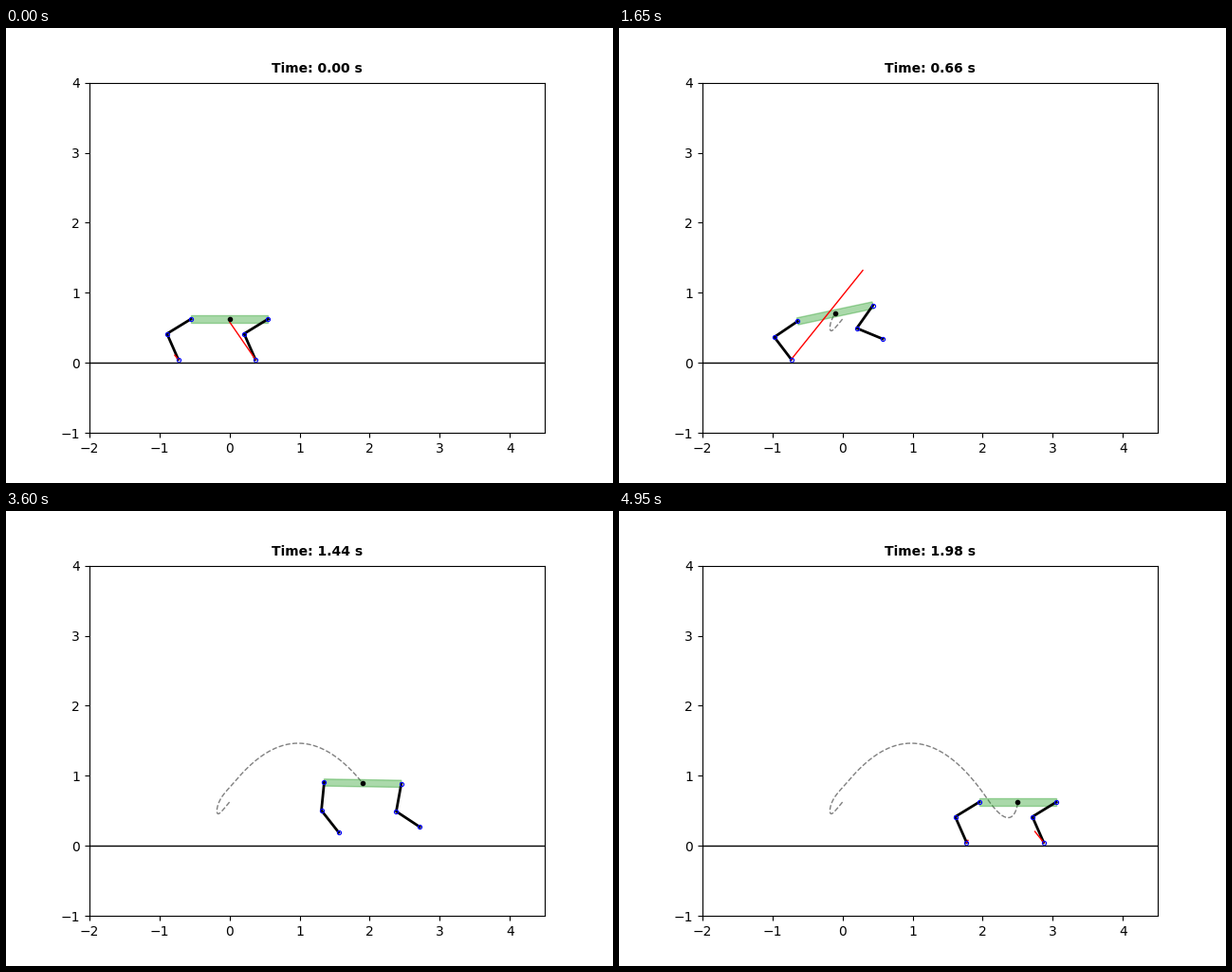
Recreate the animation shown at these times as a matplotlib script. Size 640 by 480 pixels, loop 5 s.

```python
import numpy as np
import matplotlib.pyplot as plt
from matplotlib.animation import FuncAnimation

FRAMES, STEP = 100, 0.02
LINK = 0.4                          # thigh and shank length
HALF_L, HALF_H = 0.55, 0.05         # half sizes of the torso
START, END = np.array([0, .625]), np.array([2.5, .625])
FOOT_BACK, FOOT_Y = 0.18, 0.05      # resting foot, behind its hip
LIFT, LAND, STOP = 0.78, 1.5, 1.98
APEX, APEX_T = np.array([.98, 1.465]), 1.099
SPEED, GRAVITY = 2.7, 9.81


def spline(t, times, values, ends=None):
    """Smooth cubic curve through key points; natural ends unless slopes are given."""
    x, y = np.array(times, float), np.array(values, float)
    h, n = np.diff(x), len(x)
    secant = np.diff(y, axis=0) / h.reshape((-1,) + (1,) * (y.ndim - 1))
    A, b = np.eye(n), np.zeros_like(y)
    for i in range(1, n - 1):
        A[i, i - 1:i + 2] = h[i], 2 * (h[i - 1] + h[i]), h[i - 1]
        b[i] = 3 * (h[i] * secant[i - 1] + h[i - 1] * secant[i])
    if ends is None:
        A[0, :2], A[-1, -2:] = (2, 1), (1, 2)
        ends = 3 * secant[0], 3 * secant[-1]
    b[0], b[-1] = ends
    m = np.linalg.solve(A, b)
    i = int(np.clip(np.searchsorted(x, t, side="right") - 1, 0, n - 2))
    u = (t - x[i]) / h[i]
    return (y[i] * (1 + 2 * u) * (1 - u) ** 2 + y[i + 1] * u * u * (3 - 2 * u)
            + h[i] * u * (1 - u) * (m[i] * (1 - u) - m[i + 1] * u))


def flight(t):
    s = t - APEX_T
    return APEX + [SPEED * s, -GRAVITY * s * s / 2]


def flight_speed(t):
    return np.array([SPEED, -GRAVITY * (t - APEX_T)])


def body(t):
    """Crouch and push off, fly, then absorb the landing."""
    rest = np.zeros(2)
    if t < LIFT:
        keys = [START, (-.089, .518), (-.172, .465), (-.103, .707), flight(LIFT)]
        return spline(t, (0, .28, .46, .66, LIFT), keys, (rest, flight_speed(LIFT)))
    if t < LAND:
        return flight(t)
    keys = [flight(LAND), (2.332, .407), END]
    return spline(t, (LAND, 1.64, STOP), keys, (flight_speed(LAND), rest))


def pitch(t):
    return np.radians(spline(t, (0, .28, .46, .66, .94, 1.24, 1.64, STOP),
                             (0, -5.7, -6.5, 12, 26.3, 11.4, -6.3, 0), (0, 0)))


def knee(hip, foot):
    """Joint between two equal links, bent backwards."""
    d = foot - hip
    dist = np.hypot(*d)
    bend = np.sqrt(max(LINK ** 2 - dist ** 2 / 4, 0))
    return (hip + foot) / 2 + bend * np.array([d[1], -d[0]]) / dist


fig = plt.figure(figsize=(6.4, 4.8), dpi=100)
ax = fig.add_subplot()
ax.set_aspect("equal")
ax.set_xlim(-2, 4.5)
ax.set_ylim(-1, 4)
ax.set_xticks(range(-2, 5))
ax.set_yticks(range(-1, 5))
ax.axhline(0, color="k", lw=1)
title = ax.text(0.5, 1.02, "", transform=ax.transAxes, ha="center", va="bottom",
                fontsize=10, fontweight="bold")
trail, = ax.plot([], [], "--", color="gray", lw=1)
torso, = ax.fill([0, 1, 1, 0], [0, 0, 1, 1], color="tab:green", alpha=0.4, zorder=2)
dot, = ax.plot([], [], "ko", ms=3, zorder=6)


class Leg:
    """swing holds (time, x, y) points in the air, push holds (time, fx, fy)."""

    def __init__(self, side, lift, swing, push):
        self.side, self.lift = side, lift
        self.home = side * HALF_L - FOOT_BACK
        ends = [(lift, START[0] + self.home, FOOT_Y), (LAND, END[0] + self.home, FOOT_Y)]
        self.swing = np.array([ends[0], *swing, ends[1]])
        self.push = np.array(push).T
        self.links, = ax.plot([], [], "k-", lw=2, zorder=3)
        self.arrow, = ax.plot([], [], "r-", lw=1, zorder=4)
        self.joints, = ax.plot([], [], "bo", ms=3, mew=0.8, mfc="none", zorder=5)

    def update(self, t, center, along):
        hip = center + self.side * HALF_L * along
        foot = spline(np.clip(t, self.lift, LAND), self.swing[:, 0], self.swing[:, 1:])
        points = np.array([hip, knee(hip, foot), foot]).T
        self.links.set_data(*points)
        self.joints.set_data(*points)
        times, *parts = self.push
        tip = foot + [np.interp(t, times, p) for p in parts]
        self.arrow.set_data(*np.array([foot, tip]).T)
        self.arrow.set_visible(t <= self.lift or t >= LAND)


legs = [
    Leg(-1, LIFT, [(.94, -.157, .394), (1.24, .864, .545)],
        [(0, -.05, .06), (.28, .015, .53), (.66, 1.02, 1.27),
         (LAND, -1.12, 1.2), (1.64, -.264, 1.03), (STOP, .02, .03)]),
    Leg(1, .52, [(.66, .574, .342), (.94, 1.365, 1.113), (1.24, 2.19, .91)],
        [(0, -.365, .53), (.28, .02, .72), (1.64, -.277, 1.6), (STOP, -.125, .155)]),
]
path = np.array([body(i * STEP) for i in range(FRAMES)])


def update(i):
    t, center, a = i * STEP, path[i], pitch(i * STEP)
    along = np.array([np.cos(a), np.sin(a)])
    across = np.array([-along[1], along[0]])
    torso.set_xy([center + sx * HALF_L * along + sy * HALF_H * across
                  for sx, sy in ((-1, -1), (1, -1), (1, 1), (-1, 1))])
    for leg in legs:
        leg.update(t, center, along)
    trail.set_data(*path[:i + 1].T)
    dot.set_data(*path[i:i + 1].T)
    title.set_text(f"Time: {t:.2f} s")


anim = FuncAnimation(fig, update, frames=FRAMES, interval=50,
                     init_func=lambda: update(0), repeat=True)
plt.show()
```
